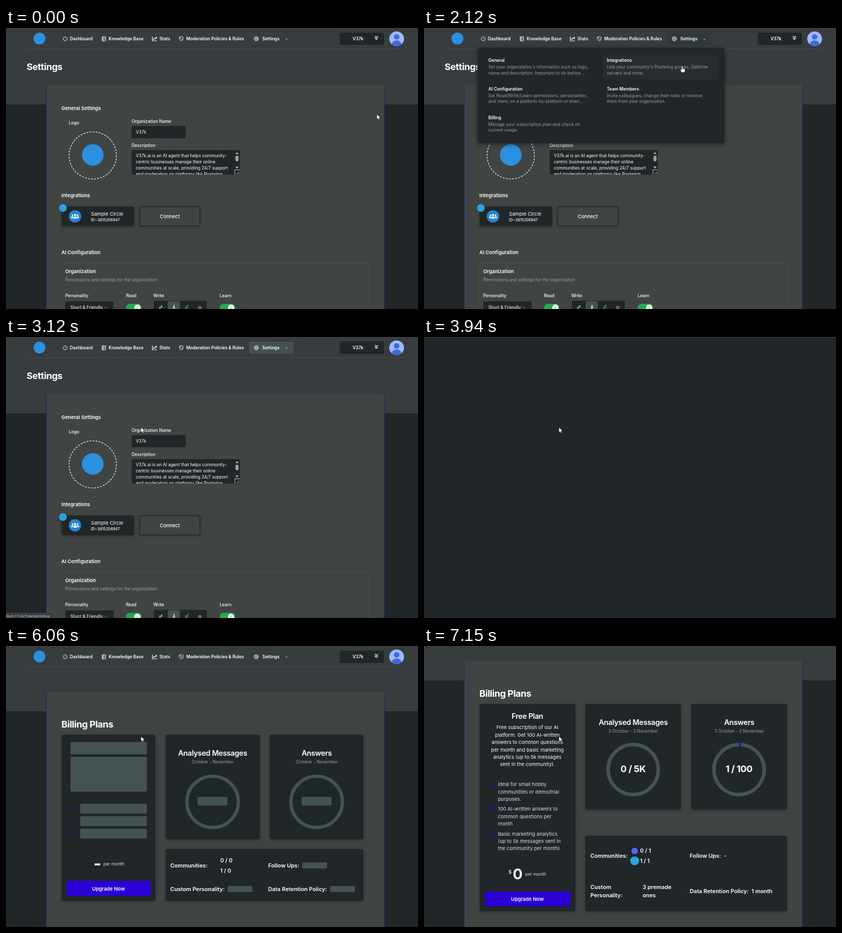
An HTML page that plays this animation: 800 px wide and 548 px high, repeating every 7.18 s.

```html
<!DOCTYPE html>
<html lang="en">
<head>
<meta charset="utf-8">
<title>Settings to billing</title>
<style>
html, body { margin: 0; width: 100%; height: 100%; overflow: hidden; background: #212628; }
svg { display: block; width: 800px; height: 548px; }
text { font: 500 8.4px Inter, sans-serif; fill: #fff; white-space: pre; }
.r { font-weight: 400; }
.b { font-weight: 600; }
.m { font-size: 9.6px; }
.l { font-size: 10.8px; font-weight: 600; }
.h3 { font-size: 14.4px; font-weight: 600; letter-spacing: -.025em; }
.h2 { font-size: 18px; font-weight: 700; letter-spacing: -.025em; }
.s { font-size: 7.2px; }
.c { text-anchor: middle; }
.mute { fill: #979da1; font-weight: 400; }
.soft { fill: #dcdfe1; font-weight: 400; }
.dark { fill: #212628; }
.bar { fill: #455253; }
.ring { fill: none; stroke: #455253; }
.line { fill: none; stroke: #fff; stroke-width: 1; stroke-linecap: round; stroke-linejoin: round; }
.card { fill: #212628; filter: drop-shadow(0 2px 3px #0004); }

.t { animation: 7180ms step-end infinite; }
.settings { animation-name: settings; }
.header { animation-name: header; }
.logo { animation-name: logo; }
.billing { animation-name: billing; }
.skeleton { animation-name: skeleton; }
.loaded { animation-name: loaded; }
.menu { animation-name: menu; }
.closed { animation-name: closed; }
.trigger { animation-name: trigger; }
.link1 { animation-name: link1; }
.link2 { animation-name: link2; }
.status { animation-name: status; }
.hand { animation-name: hand; }
.arrow { animation-name: arrow; }
.page { animation: scroll 7180ms infinite; }
.cursor { animation: move 7180ms linear infinite; }

@keyframes settings { 0% { opacity: 1 } 54.87%, 100% { opacity: 0 } }
@keyframes header { 0% { opacity: 1 } 54.87% { opacity: 0 } 61.97%, 100% { opacity: 1 } }
@keyframes logo { 0% { opacity: 1 } 54.87% { opacity: 0 } 78%, 100% { opacity: 1 } }
@keyframes billing { 0% { opacity: 0 } 61.97%, 100% { opacity: 1 } }
@keyframes skeleton { 0% { opacity: 0 } 61.97% { opacity: 1 } 87%, 100% { opacity: 0 } }
@keyframes loaded { 0% { opacity: 0 } 87%, 100% { opacity: 1 } }
@keyframes menu { 0% { opacity: 0 } 23% { opacity: 1 } 39.7%, 100% { opacity: 0 } }
@keyframes closed { 0% { opacity: 1 } 23% { opacity: 0 } 39.7%, 100% { opacity: 1 } }
@keyframes trigger {
  0% { fill: #455253; opacity: 0 }
  20.5% { fill: #455253; opacity: 1 }
  23% { fill: #30383a; opacity: 1 }
  39.7% { fill: #435052; opacity: 1 }
  54.87%, 100% { fill: #435052; opacity: 0 }
}
@keyframes link1 { 0% { opacity: 0 } 27.6% { opacity: 1 } 31.8%, 100% { opacity: 0 } }
@keyframes link2 { 0% { opacity: 0 } 35.4%, 100% { opacity: 1 } }
@keyframes status { 0% { opacity: 0 } 36% { opacity: 1 } 54.87%, 100% { opacity: 0 } }
@keyframes hand { 0% { opacity: 0 } 26.5% { opacity: 1 } 39.7%, 100% { opacity: 0 } }
@keyframes arrow { 0% { opacity: 1 } 26.5% { opacity: 0 } 39.7%, 100% { opacity: 1 } }
@keyframes scroll {
  0%, 96.9% { transform: none; animation-timing-function: ease-in-out }
  99.3%, 100% { transform: translateY(-60px) }
}
@keyframes move {
  0%, 8.4% { transform: translate(720px, 168px); animation-timing-function: ease-in }
  15.6% { transform: translate(634px, 99px); animation-timing-function: ease-out }
  20.9% { transform: translate(520px, 20px) }
  25% { transform: translate(512px, 24px) }
  29.5% { transform: translate(501px, 74px); animation-timing-function: ease-in-out }
  36.5%, 100% { transform: translate(262px, 176px) }
}
</style>
</head>
<body>
<svg viewBox="0 0 800 548">
  <defs>
    <path id="check" d="M128.2 330.7l2.5 2.2 5-5.2" fill="none" stroke="#2b00d8" stroke-width="1.7"/>
    <g id="toggle">
      <rect y="538" width="30" height="14.4" rx="7.2" fill="#22ac4c"/>
      <circle cx="22" cy="545.2" r="6" fill="#fff"/>
      <path d="M19.6 545.3l1.8 1.8 3.2-3.6" fill="none" stroke="#22ac4c"/>
    </g>
    <clipPath id="area"><rect x="244" y="238" width="200" height="48"/></clipPath>
    <clipPath id="face"><circle cx="758.5" cy="21" r="14.5"/></clipPath>
  </defs>

  <rect class="dark" width="800" height="548"/>
  <g class="page">
    <!-- settings page -->
    <g class="t settings">
      <rect width="800" height="149" fill="#373c3e"/>
      <rect x="77.5" y="114" width="658" height="500" fill="#2b2670"/>
      <rect x="79" y="111" width="655" height="500" rx="4" fill="#404543"/>
      <text class="h2" x="40" y="82">Settings</text>

      <text class="m b" x="107.5" y="159.5">General Settings</text>
      <text x="122" y="188.3">Logo</text>
      <circle class="line" cx="168.5" cy="248.5" r="46" style="stroke-width:1.2;stroke-linecap:butt;stroke-dasharray:3.6 2.4"/>
      <circle cx="168.5" cy="247.5" r="21" fill="#2b90e0"/>
      <text x="244" y="185">Organization Name</text>
      <rect class="dark" x="244" y="191" width="105" height="24" rx="3"/>
      <text class="r" x="252" y="206.2">V37k</text>
      <text x="244" y="232">Description</text>
      <rect class="dark" x="244" y="238" width="210" height="48" rx="3"/>
      <g clip-path="url(#area)">
        <text class="r" x="252" y="252.2">V37k.ai is an AI agent that helps community-</text>
        <text class="r" x="252" y="264.2">centric businesses manage their online</text>
        <text class="r" x="252" y="276.2">communities at scale, providing 24/7 support</text>
        <text class="r" x="252" y="288.2">and moderation on platforms like Postwing,</text>
      </g>
      <g fill="#a0a3a4">
        <path d="M445.3 246l3.2-4.4 3.2 4.4zM445.3 270l3.2 4.4 3.2-4.4z"/>
        <rect x="445.5" y="249" width="6" height="11" rx="3"/>
      </g>
      <path d="M444.5 286v-9.5h9.5M448 285l5-5M451 285l2-2" fill="none" stroke="#d5d7d8" stroke-width=".9"/>

      <text class="m b" x="107.5" y="330">Integrations</text>
      <rect class="card" x="108" y="348" width="141" height="38.5" rx="3"/>
      <circle cx="110.5" cy="351" r="7.5" fill="#2aa4de"/>
      <circle cx="134" cy="367.3" r="12" fill="#2785cf"/>
      <g fill="#fff">
        <circle cx="134" cy="364.8" r="2.1"/><circle cx="129.2" cy="365" r="1.6"/><circle cx="138.8" cy="365" r="1.6"/>
        <path d="M130.4 371.8q0-4.2 3.6-4.2t3.6 4.2zM126.2 370.7q0-3.4 3-3.4 1 0 1.5.5-1 1-1.2 2.9zM141.8 370.7q0-3.4-3-3.4-1 0-1.5.5 1 1 1.2 2.9z"/>
      </g>
      <text class="m r" x="165" y="366.3">Sample Circle</text>
      <text class="s" x="165" y="377.2">ID:-3815206947</text>
      <rect x="259.5" y="348.5" width="117" height="37.5" rx="3" fill="#404543" stroke="#22272a" stroke-width="1.4" style="filter:drop-shadow(0 1px 2px #0004)"/>
      <text class="m c" x="318" y="371">Connect</text>

      <text class="m b" x="107.5" y="440.7">AI Configuration</text>
      <rect x="107.5" y="459" width="597.5" height="120" rx="3" fill="none" stroke="#4b5250"/>
      <text class="m b" x="115" y="477.5">Organization</text>
      <text class="mute" x="115" y="494">Permissions and settings for the organization</text>
      <text x="115" y="524.5">Personality</text>
      <text x="233" y="524.5">Read</text>
      <text x="286" y="524.5">Write</text>
      <text x="415" y="524.5">Learn</text>
      <rect class="dark" x="115" y="533" width="94" height="26" rx="3"/>
      <text class="r" x="125" y="548.2">Short &amp; Friendly</text>
      <path class="line" d="M191.5 544.2l2.2 2.2 2.2-2.2" style="stroke:#a0a5a8;stroke-width:.8"/>
      <use href="#toggle" x="233"/>
      <use href="#toggle" x="415"/>
      <rect class="dark" x="287" y="532" width="103" height="27" rx="3"/>
      <rect class="bar" x="314" y="533" width="23.5" height="25" rx="2"/>
      <path class="line" d="M297.5 544.5h2.8l-2.8 3.5h2.8M301 541.8h2.4l-2.4 2.8h2.4" style="stroke-width:.8"/>
      <path class="line" d="M326 543.5v3l2 3M326 546.5l-2 3M323.6 546l2.4-2.2 2.6 1.8"/>
      <circle cx="326.4" cy="541.4" r="1.2" fill="#fff"/>
      <path class="line" d="M351.5 543.5l-1.4 3 2.6 2.5M350.1 546.5l-3 1.7M347.8 544.3l3.7-.8 2.8 2" style="stroke:#9a9fa1"/>
      <circle cx="353" cy="541.4" r="1.2" fill="#9a9fa1"/>
      <circle cx="376.3" cy="545.5" r="3.2" fill="#5d6466" stroke="#777d7f" stroke-width=".8"/>
    </g>

    <!-- billing page -->
    <g class="t billing">
      <rect width="800" height="127" fill="#373c3e"/>
      <rect x="77.5" y="92" width="658" height="560" fill="#2b2670"/>
      <rect x="79" y="89" width="655" height="560" rx="4" fill="#404543"/>
      <text class="h2" x="107.5" y="159.2">Billing Plans</text>

      <g class="t skeleton">
        <rect class="card" x="108" y="173" width="182" height="324" rx="4"/>
        <rect class="card" x="310" y="173" width="183" height="204" rx="4"/>
        <rect class="card" x="512" y="173" width="182" height="204" rx="4"/>
        <rect class="card" x="310" y="396" width="384" height="101" rx="4"/>
        <g class="bar">
          <rect x="125" y="187" width="148.5" height="24.5" rx="3"/>
          <rect x="125" y="216" width="148.5" height="68" rx="3"/>
          <rect x="144" y="307.5" width="129.5" height="19.5" rx="3"/>
          <rect x="144" y="331.7" width="129.5" height="19.5" rx="3"/>
          <rect x="144" y="356" width="129.5" height="19.5" rx="3"/>
          <rect x="372" y="294.3" width="58" height="17" rx="3"/>
          <rect x="574" y="294.3" width="58" height="17" rx="3"/>
          <rect x="575" y="422" width="48.5" height="12" rx="3"/>
          <rect x="430" y="468" width="48.5" height="12" rx="3"/>
          <rect x="629" y="468" width="48.5" height="12" rx="3"/>
        </g>
        <g opacity=".8">
          <use href="#check" y="-14.5"/><use href="#check" y="9.5"/><use href="#check" y="33.5"/>
        </g>
        <rect x="172" y="424" width="11" height="4" fill="#e3e5e6"/>
        <text class="soft" x="189" y="427.6">per month</text>
        <rect x="117.5" y="458" width="163.5" height="29.5" rx="3" fill="#2b00d8"/>
        <text class="m b c" x="199" y="476.5">Upgrade Now</text>

        <text class="h3 c" x="401.3" y="214">Analysed Messages</text>
        <text class="mute c" x="401.3" y="229">October - November</text>
        <circle class="ring" cx="401.2" cy="304" r="50" stroke-width="6.5"/>
        <text class="h3 c" x="603.3" y="214">Answers</text>
        <text class="mute c" x="603.3" y="229">October - November</text>
        <circle class="ring" cx="603.2" cy="304" r="50" stroke-width="6.5"/>

        <text class="l" x="319" y="432">Communities:</text>
        <text class="l" x="416" y="422.3">0 / 0</text>
        <text class="l" x="416" y="441.5">1 / 0</text>
        <text class="l" x="509" y="432">Follow Ups:</text>
        <text class="l" x="319" y="478">Custom Personality:</text>
        <text class="l" x="509" y="478">Data Retention Policy:</text>
      </g>

      <g class="t loaded">
        <rect class="card" x="108" y="173" width="186" height="404" rx="4"/>
        <rect class="card" x="313" y="173" width="186" height="206" rx="4"/>
        <rect class="card" x="519" y="173" width="186" height="206" rx="4"/>
        <rect class="card" x="313" y="430" width="392" height="147" rx="4"/>

        <text class="h3 c" x="200.8" y="202">Free Plan</text>
        <g class="c">
          <text class="m r" x="200.8" y="222.3">Free subscription of our AI</text>
          <text class="m r" x="200.8" y="236.7">platform. Get 100 AI-written</text>
          <text class="m r" x="200.8" y="251.1">answers to common questions</text>
          <text class="m r" x="200.8" y="265.5">per month and basic marketing</text>
          <text class="m r" x="200.8" y="279.9">analytics (up to 5k messages</text>
          <text class="m r" x="200.8" y="294.3">sent in the community).</text>
        </g>
        <use href="#check"/><use href="#check" y="48.3"/><use href="#check" y="96.5"/>
        <text class="m soft" x="143.5" y="333">Ideal for small hobby</text>
        <text class="m soft" x="143.5" y="347.5">communities or demo/trial</text>
        <text class="m soft" x="143.5" y="362">purposes.</text>
        <text class="m soft" x="143.5" y="381.3">100 AI-written answers to</text>
        <text class="m soft" x="143.5" y="395.8">common questions per</text>
        <text class="m soft" x="143.5" y="410.2">month</text>
        <text class="m soft" x="143.5" y="429.5">Basic marketing analytics</text>
        <text class="m soft" x="143.5" y="444">(up to 5k messages sent in</text>
        <text class="m soft" x="143.5" y="458.4">the community per month)</text>
        <text class="m" x="164" y="503.7">$</text>
        <text class="c" x="182" y="515.3" style="font-size:28.8px;font-weight:700;fill:#e9ebec">0</text>
        <text class="soft" x="196.5" y="508.3">per month</text>
        <rect x="118" y="539" width="166" height="28.5" rx="2" fill="#2b00d8"/>
        <text class="m b c" x="200.8" y="556.8">Upgrade Now</text>

        <text class="h3 c" x="406.3" y="214">Analysed Messages</text>
        <text class="mute c" x="406.3" y="229">3 October - 3 November</text>
        <circle class="ring" cx="406.2" cy="301" r="48.7" stroke-width="7"/>
        <text class="h2 c" x="406" y="306">0 / 5K</text>
        <text class="h3 c" x="612" y="214">Answers</text>
        <text class="mute c" x="612" y="229">3 October - 3 November</text>
        <circle class="ring" cx="611.8" cy="301" r="48.7" stroke-width="7"/>
        <path d="M611.8 252.3h3" stroke="#2b00d8" stroke-width="7"/>
        <text class="h2 c" x="611.5" y="306">1 / 100</text>

        <text class="l" x="323" y="473">Communities:</text>
        <circle cx="409" cy="459.8" r="6.3" fill="#5865e8"/>
        <text class="l" x="419.5" y="463">0 / 1</text>
        <circle cx="409" cy="478.8" r="8.6" fill="#2aa4de"/>
        <text class="l" x="419.5" y="482.5">1 / 1</text>
        <text class="l" x="516" y="473">Follow Ups:</text>
        <text class="l" x="582" y="473">-</text>
        <text class="l" x="323" y="533.5">Custom</text>
        <text class="l" x="323" y="550.3">Personality:</text>
        <text class="l" x="424.5" y="533.5">3 premade</text>
        <text class="l" x="424.5" y="550.3">ones</text>
        <text class="l" x="516" y="542">Data Retention Policy:</text>
        <text class="l" x="636" y="542">1 month</text>
      </g>
    </g>

    <!-- top bar -->
    <g class="t header">
      <path d="M40 40.5H773" stroke="#454b4c"/>
      <circle class="t logo" cx="65" cy="20.5" r="11.5" fill="#2b90e0"/>
      <rect class="t trigger" x="472" y="9" width="86" height="24" rx="3"/>
      <g class="line" style="stroke-width:.9">
        <path d="M112.6 24.4a4 4 0 1 1 4.8 0zM115 21.5l1.6-1.8"/>
        <path d="M187.2 17h6.2v8.2h-6.2zM189 17v8.2M190.7 19.5h1.4M190.7 22h1.4M186.4 19.2h1.4M186.4 21.2h1.4M186.4 23.2h1.4"/>
        <path d="M284.2 17v8h8.6M286 22.5l2-2.3 1.6 1.3 2.8-3.4M290.4 18h2v2" style="stroke-width:1.2"/>
        <path d="M340.3 16.8l3.6 1.3v2.6q0 3-3.6 4.6-3.6-1.6-3.6-4.6v-2.6zM337.4 18.4l5.4 5"/>
        <circle cx="486" cy="21" r="1.5"/>
        <circle cx="486" cy="21" r="3.6"/>
        <circle cx="486" cy="21" r="4.3" style="stroke-dasharray:1.7 1.68;stroke-linecap:butt"/>
        <path class="t closed" d="M543 21l1.6 1.6 1.6-1.6"/>
        <path class="t menu" d="M543 22.6l1.6-1.6 1.6 1.6"/>
      </g>
      <text class="b" x="124" y="24.1">Dashboard</text>
      <text class="b" x="199.3" y="24.1">Knowledge Base</text>
      <text class="b" x="298" y="24.1">Stats</text>
      <text class="b" x="350" y="24.1">Moderation Policies &amp; Rules</text>
      <text class="b" x="497.7" y="24.1">Settings</text>
      <rect class="dark" x="648" y="9" width="86" height="24" rx="3"/>
      <text class="b c" x="683.5" y="23.8">V37k</text>
      <path class="line" d="M716.6 16.2l2.6 2.4 2.6-2.4M716.6 19.8l2.6 2.4 2.6-2.4" style="stroke-width:1.3"/>
      <g clip-path="url(#face)">
        <circle cx="758.5" cy="21" r="14.5" fill="#9db9fa"/>
        <circle cx="758.5" cy="17.3" r="5.4" fill="#4169d8"/>
        <ellipse cx="758.5" cy="32" rx="9.3" ry="7.7" fill="#4169d8"/>
      </g>
    </g>

    <!-- settings menu -->
    <g class="t menu">
      <rect x="104" y="38" width="480" height="187" rx="3" fill="#212628" stroke="#353b3d" stroke-width=".8" style="filter:drop-shadow(0 2px 4px #0006)"/>
      <rect class="t link1" x="348" y="53" width="223" height="47" rx="3" fill="#272c2e"/>
      <rect class="t link2" x="118" y="164" width="223" height="47" rx="3" fill="#272c2e"/>
      <text class="b" x="125" y="66">General</text>
      <text class="mute" x="125" y="79">Set your organization's information such as logo,</text>
      <text class="mute" x="125" y="90.5">name and description. Important to do before...</text>
      <text class="b" x="125" y="121.8">AI Configuration</text>
      <text class="mute" x="125" y="134.5">Set Read/Write/Learn permissions, personalities,</text>
      <text class="mute" x="125" y="146">and more, on a platform-by-platform or even...</text>
      <text class="b" x="125" y="177.7">Billing</text>
      <text class="mute" x="125" y="190.5">Manage your subscription plan and check on</text>
      <text class="mute" x="125" y="202">current usage.</text>
      <text class="b" x="355" y="66">Integrations</text>
      <text class="mute" x="355" y="79">Link your community's Postwing groups, Gabhive</text>
      <text class="mute" x="355" y="90.5">servers and more.</text>
      <text class="b" x="355" y="121.8">Team Members</text>
      <text class="mute" x="355" y="134.5">Invite colleagues, change their roles or remove</text>
      <text class="mute" x="355" y="146">them from your organization.</text>
    </g>
  </g>

  <rect width="800" height="1" fill="#463f3f"/>
  <g class="t status">
    <path d="M0 538h86q2.5 0 2.5 2.5V548H0z" fill="#3a3d3f"/>
    <text x="85" y="546.6" text-anchor="end" style="font:400 6.9px 'Open Sans',sans-serif;fill:#c9cccd">0be6-1714c7b4e9a0/billing</text>
  </g>
  <g class="cursor" fill="#fff" stroke="#111" stroke-width=".7" stroke-linejoin="round">
    <path class="t arrow" d="M0 0V10.3L2.4 8.2 4 11.8 5.7 11 4.2 7.6H7.4Z"/>
    <path class="t hand" d="M-1 1q0-1.2 1.1-1.2T1.2 1V5.2q1-.7 1.8.2 1-.5 1.7.4 1.3-.2 1.3 1.2V9.500q0 3.300-2.600 3.300H.6Q-.8 12.800-1.600 11.300L-3.600 7.800q-.5-1.100.3-1.400.9-.2 2.300 1.600Z"/>
  </g>
</svg>
</body>
</html>
```
